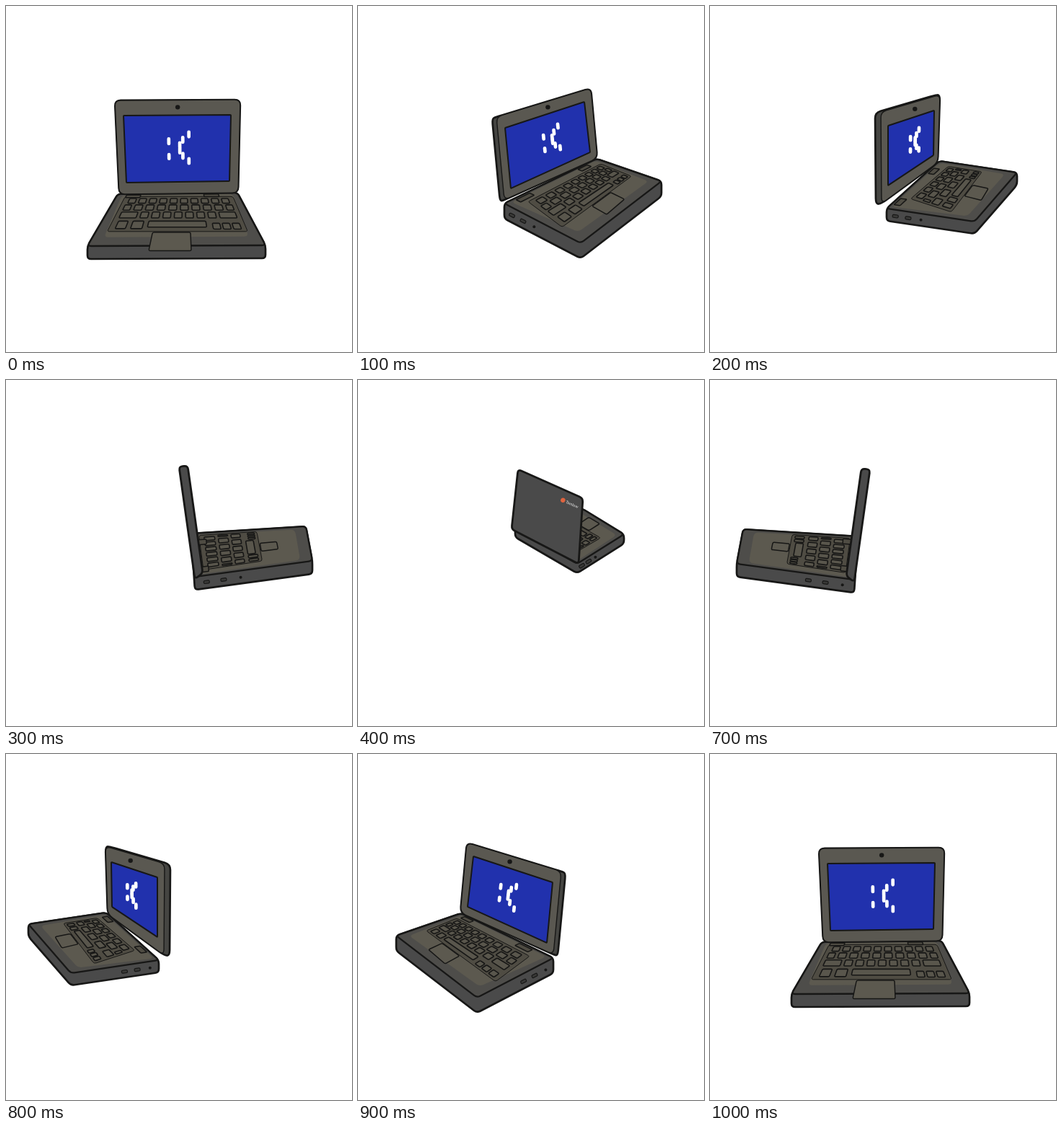
An HTML page that plays this animation: 480x480 px, repeating every 1100 ms.

```html
<!DOCTYPE html>
<html lang="en">
<head>
<meta charset="utf-8">
<title>Spinning laptop</title>
<style>
  html, body { margin: 0; width: 100%; height: 100%; overflow: hidden; background: #fff; }
  svg { display: block; width: 100vw; height: 100vh; }
  text { font: 5.5px Lato, sans-serif; fill: #ececec; }
</style>
</head>
<body>
<svg id="stage" viewBox="0 0 480 480"></svg>
<script>
const INK = '#171716', RIM = '#4e4d4a', SIDE = '#4a4a4a', DECK = '#5c594f', WELL = '#4f4c43',
      KEY = '#59564c', BACK = '#4a4a4a', BEZEL = '#5a5851', BLUE = '#2131ad', BADGE = '#e0643f';
const STEP = 100, LOOP = 1100;

const mix = (a, b, t) => [a[0] + (b[0] - a[0]) * t, a[1] + (b[1] - a[1]) * t];
const move = (points, [dx, dy]) => points.map(([x, y]) => [x + dx, y + dy]);
const range = n => [...Array(n).keys()];
const quad = s => s.split(' ').map(p => p.split(',').map(Number));

// Perspective map from the unit square to a quad (top-left, top-right, bottom-right, bottom-left).
function plane([[x0, y0], [x1, y1], [x2, y2], [x3, y3]]) {
  const ax = x1 - x2, ay = y1 - y2, bx = x3 - x2, by = y3 - y2;
  const sx = x0 - x1 + x2 - x3, sy = y0 - y1 + y2 - y3, det = ax * by - bx * ay;
  const g = (sx * by - bx * sy) / det, h = (ax * sy - sx * ay) / det;
  return (u, v) => {
    const w = g * u + h * v + 1;
    return [(x0 + (x1 - x0 + g * x1) * u + (x3 - x0 + h * x3) * v) / w,
            (y0 + (y1 - y0 + g * y1) * u + (y3 - y0 + h * y3) * v) / w];
  };
}

const patch = (at, u0, u1, v0, v1, taper = 0) =>
  [at(u0, v0), at(u1, v0), at(u1 - taper, v1), at(u0 + taper, v1)];

function hull(points) {
  const sorted = [...points].sort((a, b) => a[0] - b[0] || a[1] - b[1]);
  const chain = list => list.reduce((out, p) => {
    const turnsIn = ([a, b]) =>
      (b[0] - a[0]) * (p[1] - a[1]) - (b[1] - a[1]) * (p[0] - a[0]) <= 0;
    while (out.length > 1 && turnsIn(out.slice(-2))) out.pop();
    return [...out, p];
  }, []).slice(0, -1);
  return [...chain(sorted), ...chain(sorted.reverse())];
}

// Closed polygon with softened corners.
function shape(points, fill, width = 0, radius = 0) {
  const d = points.map((c, i) => {
    const toward = q => mix(c, q, Math.min(.5, radius / (Math.hypot(q[0] - c[0], q[1] - c[1]) || 1)));
    const from = toward(points.at(i - 1)), to = toward(points[(i + 1) % points.length]);
    return `${i ? 'L' : 'M'}${from} Q${c} ${to}`;
  }).join(' ');
  return `<path d="${d}Z" fill="${fill}" stroke="${width ? INK : 'none'}" stroke-width="${width}" stroke-linejoin="round"/>`;
}

const slab = (points, fill, offset, radius) =>
  shape(hull([...points, ...move(points, offset)]), fill, 2.7, radius);
const dot = ([x, y], r, fill = INK) => `<circle cx="${x}" cy="${y}" r="${r}" fill="${fill}"/>`;
const tilted = ([x, y], a, b, art) =>
  `<g transform="translate(${x} ${y}) rotate(${Math.atan2(b[1] - a[1], b[0] - a[0]) * 180 / Math.PI})">${art}</g>`;

function keyboard(at, columns) {
  const key = (...box) => shape(patch(at, ...box), KEY, 1.6, 1.5);
  const row = (count, edge, v) => {
    const size = (1 - 2 * edge) / count, gap = size * .16;
    const keys = range(count).map(i => key(edge + i * size + gap, edge + (i + 1) * size - gap, v, v + .18));
    if (edge) keys.push(key(0, edge - gap, v, v + .18), key(1 - edge + gap, 1, v, v + .18));
    return keys.join('');
  };
  const arrows = range(3).map(i => key(.78 + i * .08, .84 + i * .08, .84, .99)).join('');
  return range(3).map(i => row(columns - i * 2 + (i > 1), i * .08, .03 + i * .24)).join('') +
    key(.01, .09, .78, .98) + key(.13, .22, .78, .98) + key(.26, .73, .78, .94) + arrows;
}

function face(at) {
  const bar = (u, v, half) =>
    `<path d="M${at(u, v - half)} L${at(u, v + half)}" stroke="#fff" stroke-width="4.7" stroke-linecap="round"/>`;
  const mouth = range(6).map(i => {
    const t = i / 5;
    return bar(.515 + .09 * (2 * t - 1) ** 2, .28 + .4 * t, .035);
  });
  return bar(.415, .38, .035) + bar(.415, .61, .03) + mouth.join('');
}

// The socket row sits on the side wall turned to the viewer.
function sockets({ deck, drop, near }) {
  const [back, front] = near === 'right' ? [deck[1], deck[2]] : [deck[0], deck[3]];
  const slot = `<rect x="-4" y="-2" width="8" height="4" rx="1.5" fill="#393937" stroke="${INK}" stroke-width="1.2"/>`;
  return range(3).map(i => {
    const [x, y] = mix(back, front, .1 + i * .145), place = [x, y + drop * .52];
    return i === (near === 'right' ? 0 : 2) ? dot(place, 2) : tilted(place, back, front, slot);
  }).join('');
}

function base(view) {
  const { deck, keys, drop, columns, near } = view, at = plane(deck);
  let art = slab(deck, SIDE, [0, drop], 5) + shape(deck, RIM, 2.3, 5) +
    shape(patch(at, .04, .96, .03, .88, .03), DECK, 0, 6);
  if (keys) {
    const pad = plane(keys);
    art += shape(patch(pad, -.04, 1.04, -.05, 1.05), WELL, 1, 3) + keyboard(pad, columns) +
      shape(patch(pad, .31, .6, 1.07, 1.46), DECK, 1.5, 2);
  }
  const hinges = [.08, .72].map(u => shape(patch(at, u, u + .12, .03, .1), WELL, 1.5, 1)).join('');
  return art + hinges + (near ? sockets(view) : '');
}

function lid({ lid, screen, thick, bare }) {
  if (!screen) {
    const at = plane(lid);
    const badge = dot([0, 0], 3.2, BADGE) + '<text x="4.5" y="2">Tamlow</text>';
    return shape(lid, BACK, 2.8, 5) + (bare ? '' : tilted(at(.72, .17), lid[0], lid[1], badge));
  }
  const lens = mix(plane(lid)(.5, 0), plane(screen)(.5, 0), .47);
  return slab(lid, '#454542', thick, 8) + shape(lid, BEZEL, 1.4, 8) +
    shape(screen, BLUE, 2, 1) + dot(lens, 3.2) + face(plane(screen));
}

// Key corners. Lid and screen start top-left; deck and keys start back-left as the typist sees them.
const front = {
  lid: quad('151,131 325,130 322,259 157,261'), screen: quad('163,152 312,151 310,243 167,245'),
  deck: quad('155,261 321,259 360,332 113,333'), keys: quad('170,266 310,266 327,310 149,310'),
  drop: 18, thick: [0, 0], columns: 10
};
const quarter = {
  lid: quad('151,123 282,163 271,278 142,220'), screen: quad('160,142 270,178 262,262 152,212'),
  deck: quad('143,221 271,283 165,338 53,252'), keys: quad('138,230 231,279 188,310 99,246'),
  drop: 21, thick: [6, 2], columns: 9, near: 'right', mirror: [474, -9]
};
const oblique = {
  lid: quad('138,128 220,152 219,279 141,222'), screen: quad('146,150 210,171 210,254 147,212'),
  deck: quad('139,220 212,286 90,304 31,236'), keys: quad('126,229 174,271 123,287 83,236'),
  drop: 17, thick: [8, 1], columns: 6, near: 'right', mirror: [457, -5]
};
const profile = {
  lid: quad('210,123 222,124 200,280 189,272'), bare: true,
  deck: quad('204,217 200,277 37,255 46,207'), keys: quad('190,221 184,265 110,254 117,216'),
  drop: 18, columns: 6, near: 'right', mirror: [462, -4]
};
const rear = {
  lid: quad('159,166 249,126 258,209 165,257'),
  deck: quad('253,207 167,257 102,216 161,180'), keys: quad('222,216 172,241 138,221 190,192'),
  drop: 13, columns: 6, near: 'right', mirror: [471, -2]
};
const back = {
  lid: quad('176,142 298,142 295,230 179,230'),
  deck: quad('297,226 177,226 190,190 284,190'), drop: 16
};

function mirrored(view) {
  const [sum, lift] = view.mirror;
  const flip = q => q && [1, 0, 3, 2].map(i => [sum - q[i][0], q[i][1] + lift]);
  const { lid, screen, deck, keys, thick } = view;
  return { ...view, near: 'left', lid: flip(lid), screen: flip(screen), deck: flip(deck), keys: flip(keys),
           thick: thick && [-thick[0], thick[1]] };
}

const returning = [rear, profile, oblique, quarter];
const turning = returning.map(mirrored).reverse();
const views = [front, ...turning, back, ...returning, front];

const stage = document.getElementById('stage');
stage.innerHTML = views.map(view => `<g display="none">${base(view)}${lid(view)}</g>`).join('');
const layers = [...stage.children];

function render(time) {
  const current = Math.floor((time % LOOP) / STEP);
  layers.forEach((layer, i) => layer.setAttribute('display', i === current ? 'inline' : 'none'));
}

function tick() {
  render(performance.now());
  requestAnimationFrame(tick);
}
tick();
</script>
</body>
</html>
```
